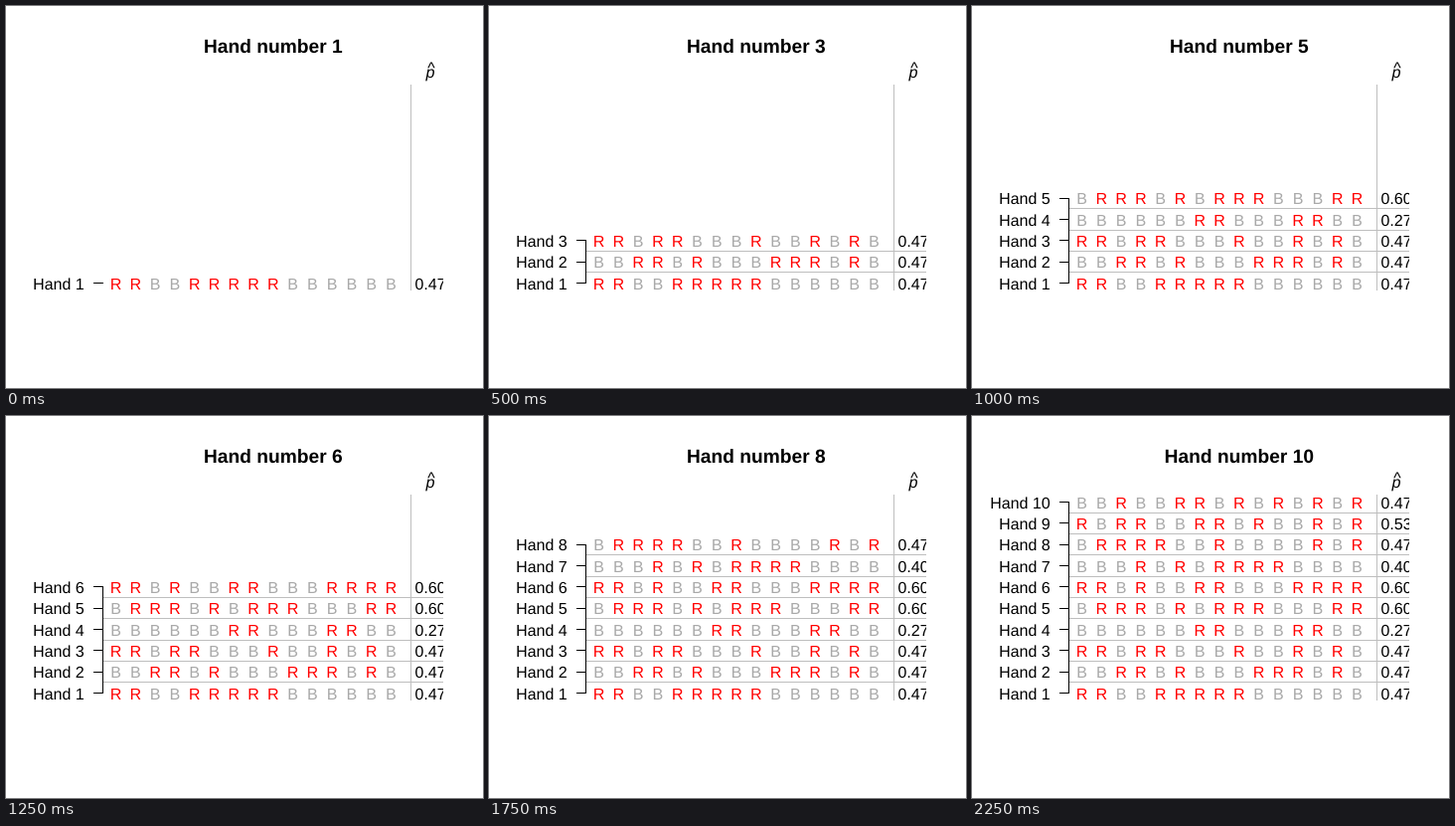
Write a matplotlib script that moves like this. It is 480 by 384 pixels and loops after 2500 ms.

```python
from math import ceil, floor

import matplotlib.pyplot as plt
from matplotlib.animation import FuncAnimation
from matplotlib.patches import PathPatch, Rectangle
from matplotlib.textpath import TextPath
from matplotlib.transforms import Affine2D

WIDTH, HEIGHT, DPI = 480, 384, 96
EM, LINE = 16, 19.2
LEFT, RIGHT = 5.1 * LINE, WIDTH - 2.1 * LINE
TOP, BOTTOM = 4.1 * LINE, HEIGHT - 5.1 * LINE
COLUMN = (RIGHT - LEFT) / (16 * 1.08)
ROW = (BOTTOM - TOP) / (9 * 1.08)
RULE = "#bebebe"
CARD_COLORS = {"R": "#ff0000", "B": "#a9a9a9"}
ADVANCE = {"R": 0.722, "B": 0.667}
DIGIT = 0.556

HANDS = [
    "RRBBRRRRRBBBBBB",
    "BBRRBRBBBRRRBRB",
    "RRBRRBBBRBBRBRB",
    "BBBBBBRRBBBRRBB",
    "BRRRBRBRRRBBBRR",
    "RRBRBBRRBBBRRRR",
    "BBBRBRBRRRRBBBB",
    "BRRRRBBRBBBBRBR",
    "RBRRBBRRBRBBRBR",
    "BBRBBRRBRBRBRBR",
]

fig = plt.figure(figsize=(WIDTH / DPI, HEIGHT / DPI), dpi=DPI, facecolor="white")
ax = fig.add_axes([0, 0, 1, 1])
ax.set_xlim(0, WIDTH)
ax.set_ylim(HEIGHT, 0)
ax.axis("off")


def column_x(column):
    return LEFT + (column - 0.36) * COLUMN


def row_y(row):
    return BOTTOM - (row - 0.64) * ROW


def text_at(text, x, baseline, color="black", size=EM, **font):
    path = TextPath((0, 0), text, size=size, prop={"family": "Liberation Sans", **font})
    place = Affine2D().scale(1, -1).translate(x, baseline)
    patch = PathPatch(path, fc=color, lw=0, snap=False, transform=place + ax.transData)
    return ax.add_patch(patch)


def bar(x0, y0, x1, y1, color, zorder=1):
    box = Rectangle((x0, y0), x1 - x0, y1 - y0, fc=color, lw=0, zorder=zorder)
    return ax.add_patch(box)


def make_title(number):
    size = 1.2 * EM
    half = size * (6.723 + DIGIT * len(str(number))) / 2
    return text_at(f"Hand number {number}", (LEFT + RIGHT) / 2 - half, 47,
                   size=size, weight="bold")


def make_row(number, cards):
    y = row_y(number)
    baseline = ceil(y + 0.358 * EM)
    label_width = EM * (2.668 + DIGIT * len(str(number)))
    parts = [
        text_at(f"Hand {number}", LEFT - LINE - label_width, baseline),
        bar(88, floor(y), 98, floor(y) + 1, "black", zorder=2),
    ]
    for column, card in enumerate(cards, 1):
        x = column_x(column) - ADVANCE[card] * EM / 2
        parts.append(text_at(card, x, baseline, CARD_COLORS[card]))

    share = f"{cards.count('R') / len(cards):.2f}"
    value = text_at(share, column_x(17) - EM * (3 * DIGIT + 0.278) / 2, baseline)
    value.set_clip_path(plot_area)
    parts.append(value)

    if number > 1:
        edge = floor(row_y(number - 0.5))
        parts.append(bar(98, edge, 440, edge + 1, RULE))
    return parts


plot_area = Rectangle((98, 0), 440 - 98, HEIGHT, transform=ax.transData)
bar(407, 79, 408, 286, RULE)
text_at("p", column_x(17) - DIGIT * EM / 2, 72, style="italic")
text_at("^", 424.2, 67.5)
axis_line = bar(97, floor(row_y(1)), 98, floor(row_y(1)) + 1, "black", zorder=2)

titles = [make_title(n) for n in range(1, len(HANDS) + 1)]
rows = [make_row(n, cards) for n, cards in enumerate(HANDS, 1)]


def update(frame):
    for i, (title, row) in enumerate(zip(titles, rows)):
        title.set_visible(i == frame)
        for part in row:
            part.set_visible(i <= frame)
    top = floor(row_y(frame + 1))
    axis_line.set_y(top)
    axis_line.set_height(floor(row_y(1)) + 1 - top)
    return []


anim = FuncAnimation(fig, update, frames=len(HANDS), interval=250, repeat=True)
plt.show()
```
